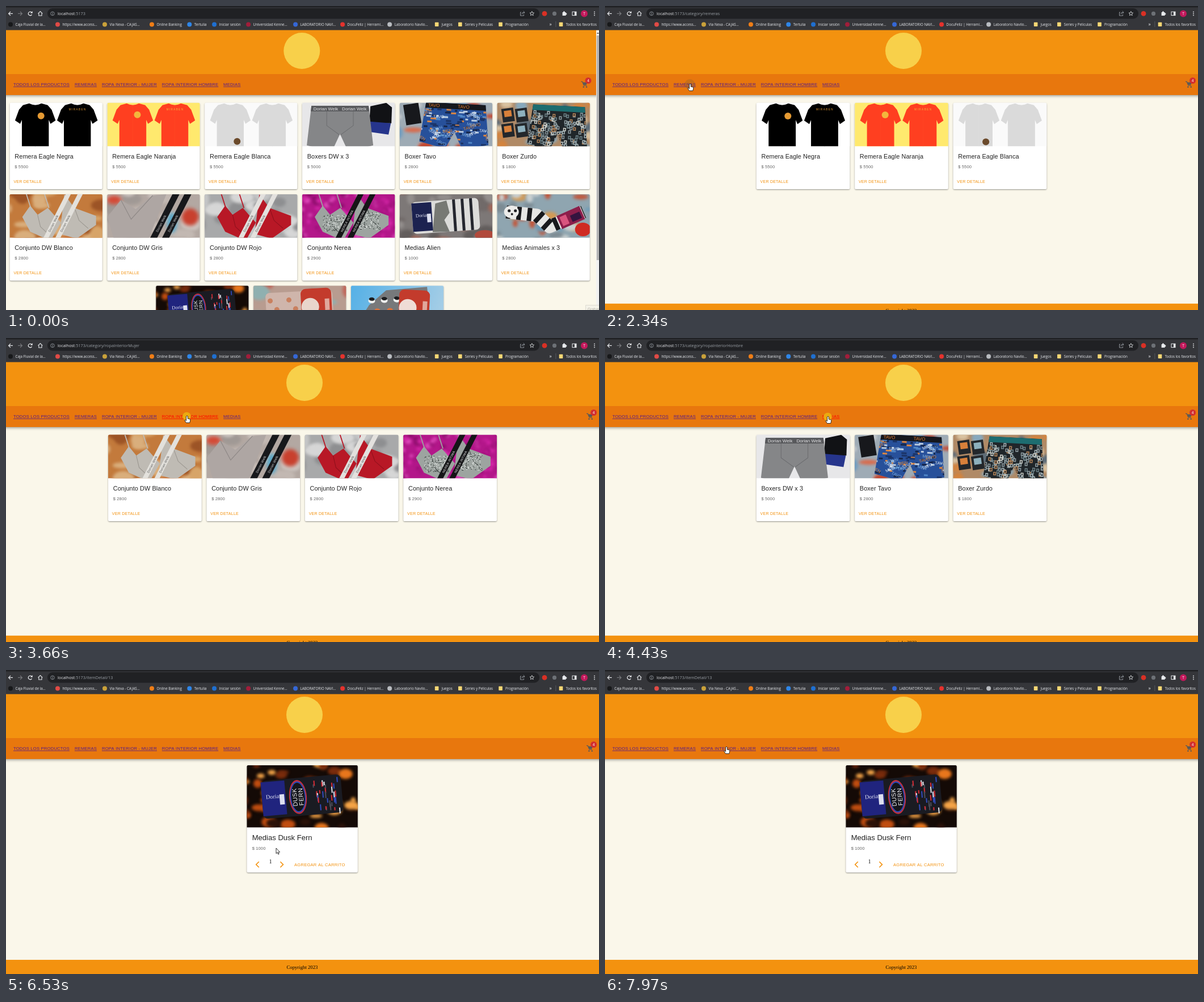
An HTML page with a canvas for the animation above (8 s loop, 1045 by 536 pixels).

```html
<!DOCTYPE html>
<html lang="es">
<head>
<meta charset="utf-8">
<style>
html, body { margin: 0; width: 100%; height: 100%; overflow: hidden; background: #faf7ea; }
canvas { display: block; width: 100vw; height: 100vh; }
</style>
</head>
<body>
<canvas id="stage" width="1045" height="536"></canvas>
<script>
const W = 1045, H = 536, LOOP = 8000, STEP = 70;
const SANS = '"Liberation Sans", Arial, sans-serif';
const SERIF = '"Liberation Serif", "Times New Roman", serif';
const UI = '"Open Sans", "Noto Sans", sans-serif';
const ORANGE = '#f3920f';
const screen = document.getElementById('stage').getContext('2d');
let g = screen, seed = 1;

// ---- drawing helpers ----
const rnd = () => (seed = seed * 16807 % 2147483647) / 2147483647;
const pick = list => list[Math.floor(rnd() * list.length)];
function rect(color, x, y, w, h, r = 0) {
  g.fillStyle = color; g.beginPath(); g.roundRect(x, y, w, h, r); g.fill();
}
function oval(color, x, y, rx, ry = rx) {
  g.fillStyle = color; g.beginPath(); g.ellipse(x, y, rx, ry, 0, 0, 7); g.fill();
}
function arc(color, width, x, y, r, from = 0, to = 7) {
  g.strokeStyle = color; g.lineWidth = width; g.beginPath(); g.arc(x, y, r, from, to); g.stroke();
}
function trace(pts) {
  g.beginPath();
  for (let i = 0; i < pts.length; i += 2) g.lineTo(pts[i], pts[i + 1]);
}
function poly(color, ...pts) { g.fillStyle = color; trace(pts); g.closePath(); g.fill(); }
function line(color, width, pts, dash = []) {
  g.strokeStyle = color; g.lineWidth = width; g.setLineDash(dash);
  trace(pts); g.stroke(); g.setLineDash([]);
}
function chevron(color, width, x, y, dx, dy) {
  line(color, width, [x + dx, y - dy, x, y, x + dx, y + dy]);
}
function text(str, x, y, size, color, font = SANS, gap = 0, align = 'left') {
  g.font = size + 'px ' + font; g.letterSpacing = gap + 'px';
  g.textAlign = align; g.fillStyle = color; g.fillText(str, x, y);
  return g.measureText(str).width;
}
function at(x, y, deg, draw) {
  g.save(); g.translate(x, y); g.rotate(deg * Math.PI / 180); draw(); g.restore();
}
function scatter(n, start, x, y, w, h, draw) {
  seed = start;
  for (let i = 0; i < n; i++) draw(x + rnd() * w, y + rnd() * h, i);
}
// soft blurred backdrop of a photo
function backdrop(base, n, size, ...colors) {
  rect(base, -5, -20, 175, 125);
  g.filter = 'blur(2.5px)';
  scatter(n, n * 7 + size, -6, -12, 175, 100, (x, y) =>
    oval(pick(colors), x, y, size * (.4 + rnd()), size * (.3 + rnd() * .7)));
  g.filter = 'none';
}

// ---- product photos, drawn in a 163 x 77 box ----
function shirts(back, cloth, mark, mx, my, word) {
  rect(back, 0, -10, 165, 100);
  for (const cx of [45, 119]) for (const side of [-1, 1]) {
    const half = [0, 4, 6, 3, 11, 1, 22, 4, 29, 12, 36, 31, 27, 37, 24, 30, 24, 80, 0, 80];
    poly(cloth, ...half.map((v, i) => i % 2 ? v : cx + side * v - side * .3));
  }
  oval(mark, mx, my, 6);
  if (word) text(word, 119.5, 13, 4.6, mark, SANS, 1.4, 'center');
}
function boxer(x, y, w, tilt, cloth, band, word, ink, print) {
  at(x, y, tilt, () => {
    trace([.07 * w, 0, .93 * w, 0, w, 70, .62 * w, 80, .5 * w, 50, .38 * w, 80, 0, 70]);
    g.closePath(); g.clip();
    rect(cloth, 0, 0, w, 80);
    if (print) print(w);
    rect(band, 0, 0, w, 10);
    for (const k of [.1, .53]) text(word, k * w, 7.8, 8, ink);
  });
}
function bands(cloth, ink, word, width, x) {
  for (const dx of [0, 21]) {
    line(cloth, width, [x + dx, -6, x - 46 + dx, 84]);
    at(x - 35 + dx, 67, -63, () => text(word, 0, 0, 5.5, ink, SANS, .3));
  }
}
function lingerie(cloth, shade) {
  for (const x of [28, 60]) line(cloth, 1.8, [x + 9, 24, x, -4]);
  poly(cloth, 22, 40, 36, 20, 49, 36, 67, 24, 90, 50, 72, 82, 36, 66);
  poly(cloth, 96, 0, 114, 24, 152, 38, 152, 54, 118, 78, 88, 70);
  line(shade, 1, [49, 36, 54, 57, 70, 72]);
  line(shade, 1, [114, 24, 122, 46, 138, 60]);
}
function sock(cloth, tilt, tag, draw) {
  at(82, 37, tilt, () => {
    rect(cloth, -60, -27, 118, 56, 7);
    draw();
    if (!tag) return;
    rect(tag, -60, -25, 35, 50);
    text('Dorian', -54, 0, 8.5, '#e5e8f6', SERIF);
    rect('#dcdff0', -34, -5, 7, 15);
  });
}
function roundTag(cloth, disc, tilt, draw) {
  sock(cloth, tilt, '', () => {
    draw();
    rect('#c33b2c', 2, -31, 54, 62, 9);
    oval(disc, 18, 1, 15.5);
    rect('#e0a79c', 44, -12, 8, 20);
  });
}

const photos = [
  () => shirts('#fff', '#000', '#e59a33', 55, 23, 'MIRABEN'),
  () => shirts('#ffe96e', '#ff3f20', '#f3b73c', 53, 21, 'MIRABEN'),
  () => shirts('#fafafa', '#dadada', '#6b4a2b', 57, 68),
  () => {
    rect('#e7e7e9', 0, -10, 165, 100);
    poly('#111215', 120, 6, 148, 0, 158, 8, 157, 36, 118, 36);
    poly('#26358c', 119, 33, 156, 36, 152, 56, 117, 51);
    boxer(8, 5, 117, 0, '#858688', '#58595c', 'Dorian Welk', '#e6e6e8',
      w => [.3, .7].forEach(k => line('#6b6c6f', 1, [w * k, 10, w * k, 35, w / 2, 52])));
  },
  () => {
    backdrop('#9eabb5', 26, 13, '#c4472f', '#6f9cc0', '#c9cdd0', '#7d8a99', '#d96a4b');
    at(6, 4, -9, () => rect('#17181c', 0, 0, 27, 36));
    boxer(38, -2, 122, 3, '#27509a', '#16181d', 'TAVO', '#e07a2c', w => {
      scatter(110, 8, 0, 8, w, 64, (x, y) =>
        rect(pick(['#1b3468', '#4f86c6', '#b9cbe0', '#16264a', '#d98543']), x, y, 3 + rnd() * 8, 3));
      scatter(26, 21, -6, 14, w, 62, (x, y, i) => at(x, y, rnd() * 70 - 35, () =>
        text(i % 2 ? 'TAVO' : 'MEN', 0, 0, 7.5, pick(['#e6edf5', '#e28a3c', '#7fb0e0']))));
    });
  },
  () => {
    backdrop('#b08a66', 24, 12, '#d3843f', '#87a9bd', '#5d6c78', '#d9c2a0');
    for (let i = 0; i < 4; i++) at(7 + i % 2 * 24, 11 + (i >> 1) * 27, -8, () => {
      rect('#23272b', 0, 0, 21, 24);
      rect(i % 2 ? '#8db0bd' : '#d8803a', 4, 4, 13, 11);
    });
    boxer(56, 2, 106, 3, '#20262a', '#1d6d70', '', '#fff', w =>
      scatter(170, 5, 0, 10, w, 66, (x, y) => {
        rect(pick(['#a5b4b8', '#d0d3cc', '#6d8288', '#8f9da2', '#b5855a']), x, y, 5, 6);
        rect('#20262a', x + 1.5, y + 1.5, 2, 3);
      }));
  },
  () => {
    backdrop('#c37a3c', 26, 16, '#d7a468', '#b9622c', '#d9ae7c', '#c8743a', '#9c5426');
    lingerie('#bfbbb4', '#98948d');
    bands('#e3e1dc', '#555', 'Dorian Welk', 8, 106);
  },
  () => {
    backdrop('#b3a8a2', 18, 15, '#c2b8b2', '#a09995', '#cdc5c0');
    g.filter = 'blur(3px)';
    oval('#c8402e', 146, 40, 15, 15); oval('#5aa5c4', 114, 50, 9, 18); oval('#d34a36', 12, 10, 13, 8);
    g.filter = 'none';
    poly('#aea6a3', 0, 40, 24, 10, 50, 26, 80, 2, 104, 0, 72, 80, 12, 80);
    line('#8f8987', 1.2, [24, 10, 42, 44, 80, 2]);
    bands('#17181b', '#ddd', 'Dorian Welk', 11, 124);
  },
  () => {
    backdrop('#a8a9aa', 20, 17, '#c4c5c6', '#8e8f91', '#d6d6d6');
    lingerie('#b81826', '#8d0f1b');
    bands('#e3e1de', '#555', 'Dorian Welk', 8, 106);
  },
  () => {
    backdrop('#b3178a', 120, 5, '#d828ab', '#8b0f6b', '#e04fbd', '#a0147c');
    lingerie('#9da4a0', '#3e4543');
    g.globalCompositeOperation = 'source-atop';
    for (const [x, y, w, h] of [[36, 36, 42, 28], [98, 32, 38, 30]])
      scatter(130, x, x, y, w, h, (px, py) => rect(pick(['#3e4543', '#dfe3e1']), px, py, 1.8, 1.2));
    g.globalCompositeOperation = 'source-over';
    bands('#151517', '#eee', 'NEREA INTIMA', 9, 106);
  },
  () => {
    backdrop('#7d7877', 25, 14, '#938e8c', '#625d5c', '#a0675a', '#716a69');
    oval('#b14a3c', 150, 72, 18, 9);
    sock('#dcdcda', -4, '#1c2250', () => {
      for (let x = 12; x < 50; x += 15) rect('#24262e', x, -27, 5, 56);
      poly('#777974', -26, 28, -18, -22, 2, -26, 6, -4, -4, 8, 4, 29);
    });
  },
  () => {
    backdrop('#8fa5b0', 40, 10, '#6c9cb8', '#d39a55', '#c9cfd0', '#7c8b93', '#c2573b');
    oval('#cf2a22', 151, 62, 14, 12);
    const path = [16, 31, 70, 37, 92, 57, 152, 31];
    g.lineJoin = 'round';
    line('#e6e6e4', 23, path);
    line('#18191c', 23, path, [8, 10.5]);
    oval('#ececea', 25, 31, 13, 11);
    for (const x of [21, 32]) oval('#202124', x, 29, 2.6);
    oval('#202124', 26, 35, 2);
    at(126, 43, -24, () => {
      rect('#8c1f4b', -18, -13, 44, 25);
      rect('#d9557f', -14, -9, 12, 17); rect('#35143f', 4, -4, 18, 12);
    });
  },
  () => {
    backdrop('#140a06', 48, 8, '#e8761c', '#f5a447', '#7a2c0c', '#c04d10', '#2a1108');
    sock('#1a1b22', -5, '#20247e', () => {
      scatter(34, 9, 16, -24, 36, 46, (x, y) =>
        rect(pick(['#d9dbe2', '#cc2b34', '#3049b5', '#4a4c58']), x, y, 1.8, 4 + rnd() * 6));
      ['#c62f3a', '#2c48b4', '#14151b'].forEach((color, i) => oval(color, -7, 1, 13 - i * 1.5, 25 - i * 2));
      at(-8, 1, -90, () => ['DUSK', 'FERN'].forEach((word, i) =>
        text(word, 0, i * 9 - .5, 9, '#f4f4f6', 'bold 9px ' === word ? SANS : SANS, .4, 'center')));
    });
  },
  () => {
    backdrop('#b89c90', 24, 15, '#c0675a', '#a3b3ab', '#cdb6a8', '#b0877c', '#8fb0b0');
    roundTag('#cfb5ab', '#e9d5cc', -3, () => {
      for (let i = 0; i < 6; i++) oval('#c9805f', -52 + i * 11, i % 3 * 16 - 13, 4.5);
    });
  },
  () => {
    const sky = g.createLinearGradient(0, 0, 163, 60);
    sky.addColorStop(0, '#55b0e6'); sky.addColorStop(1, '#a9cfe6');
    rect(sky, 0, -10, 165, 100);
    poly('#77797b', 14, 62, 32, 34, 62, 8, 134, 2, 136, 22, 120, 62, 24, 70);
    roundTag('#0000', '#efdcd6', 3, () => {
      for (let i = 0; i < 5; i++) {
        const x = i * 11 - 46, y = i % 2 * 20 - 8 - i;
        oval('#eef0ee', x, y, 6, 4.5); oval(i % 2 ? '#e0743c' : '#1d1e20', x, y - 3, 5, 3);
      }
    });
  }
];

const products = [
  ['Remera Eagle Negra', 5500], ['Remera Eagle Naranja', 5500], ['Remera Eagle Blanca', 5500],
  ['Boxers DW x 3', 5000], ['Boxer Tavo', 2800], ['Boxer Zurdo', 1800],
  ['Conjunto DW Blanco', 2800], ['Conjunto DW Gris', 2800], ['Conjunto DW Rojo', 2800],
  ['Conjunto Nerea', 2900], ['Medias Alien', 1000], ['Medias Animales x 3', 2800],
  ['Medias Dusk Fern', 1000], ['Medias Peach', 1000], ['Medias Sushi', 1000]
];

function panel(i, x, y, w, h, imageH, shift) {
  g.save();
  g.shadowColor = 'rgba(0,0,0,.42)'; g.shadowBlur = 2.2; g.shadowOffsetY = .9;
  rect('#fff', x, y, w, h, 2.2);
  g.restore();
  g.save();
  g.beginPath(); g.roundRect(x, y, w, imageH, [2.2, 2.2, 0, 0]); g.clip();
  g.translate(x, y); g.scale(w / 163, w / 163); g.translate(0, shift);
  photos[i]();
  g.restore();
}
function price(i, x, y) {
  text('$ ' + products[i][1], x, y, 7.62, 'rgba(0,0,0,.6)', SANS, .082);
}
function card(i, x, y, w) {
  panel(i, x, y, w, 152.3, 76.4, 0);
  text(products[i][0], x + 8.7, y + 98, 10.89, 'rgba(0,0,0,.87)', SANS, .082);
  price(i, x + 8.7, y + 115.2);
  text('VER DETALLE', x + 6.8, y + 141.3, 7.08, ORANGE, SANS, .202);
}
// a centred row of products first .. last
function row(first, last, y, mid, pitch) {
  const n = last - first + 1;
  for (let k = 0; k < n; k++)
    card(first + k, mid + (k - n / 2) * pitch + 4.35, y, pitch - 8.7);
}
function detail(i) {
  const x = 424.5, y = 168;
  panel(i, x, y, 195.3, 189, 109.5, 8);
  text(products[i][0], x + 9.2, y + 131.5, 13.06, 'rgba(0,0,0,.87)');
  price(i, x + 9.2, y + 149.3);
  chevron(ORANGE, 1.7, x + 16.3, y + 175, 5, 5);
  chevron(ORANGE, 1.7, x + 63.9, y + 175, -5, 5);
  text('1', x + 41.5, y + 173, 9.4, '#000', SERIF, 0, 'center');
  text('AGREGAR AL CARRITO', x + 83.5, y + 177.7, 7.62, ORANGE, SANS, .218);
}

// ---- browser frame ----
const FOLDER = '#f7d774';
const bookmarks = [
  ['Caja Fluvial de la...', '#17181a'], ['https://www.access...', '#e04a45'],
  ['Via Nexa - CAJAS...', '#c9a13a'], ['Online Banking', '#ef7d16'], ['Tertulia', '#2e86e8'],
  ['Iniciar sesión', '#1f6fd0'], ['Universidad Kenne...', '#a11d3a'],
  ['LABORATORIO NAVI...', '#3567d6'], ['DocuFeliz | Herrami...', '#e5322d'],
  ['Laboratorio Navilo...', '#b9bcc0'], ['Juegos', FOLDER], ['Series y Peliculas', FOLDER],
  ['Programación', FOLDER]
];
const PALE = '#e8eaed', DIM = '#9aa0a6';
function bookmark(x, label, color) {
  if (color === FOLDER) rect(color, x - 3.3, 28.8, 6.6, 7.2, .8); else oval(color, x, 32.4, 4);
  const width = text(label, x + 8.5, 34.8, 6.25, PALE, UI);
  return x + 22 + (label.endsWith('...') ? 61 : width);
}
function browser(path) {
  const y = 13.4;
  rect('#35363a', 0, 0, W, 42.5);
  rect('#202124', 0, 0, W, 2.5);
  rect('#202124', 73, 4, 867, 18.5, 9);
  chevron(PALE, 1.2, 4.6, y, 3.4, 3.4); line(PALE, 1.2, [4.8, y, 12, y]);
  chevron('#77797d', 1.2, 28.4, y, -3.4, 3.4); line('#77797d', 1.2, [21, y, 28.2, y]);
  arc(PALE, 1.2, 42.7, y, 3.3, .5, 5.6);
  poly(PALE, 46.7, 9, 46.7, 12.8, 43, 12.8);
  line(PALE, 1.1, [56.4, y, 60.4, 9.6, 64.4, y]);
  line(PALE, 1.1, [57.8, 12.4, 57.8, 17, 63, 17, 63, 12.4]);
  arc(DIM, .8, 82, y, 3.3);
  rect(DIM, 81.6, 12.8, .9, 2.6); rect(DIM, 81.6, 11.3, .9, .9);
  const host = text('localhost', 91, 16, 7.25, PALE, UI);
  text(':5173' + path, 91 + host, 16, 7.25, DIM, UI);
  line(DIM, .9, [908, 11, 906.5, 11, 906.5, 17, 912.5, 17, 912.5, 15]);
  chevron(DIM, .9, 914, 11.4, -2.4, 2.4); line(DIM, .9, [909, 14.5, 910, 11.8, 914, 11.4]);
  const star = [];
  for (let i = 0; i <= 10; i++) {
    const r = i % 2 ? 1.8 : 4, a = i * Math.PI / 5;
    star.push(926.8 + r * Math.sin(a), y - r * Math.cos(a));
  }
  line(PALE, .8, star);
  oval('#d93025', 949, y, 4.4);
  oval('#6d7176', 966.5, y, 3.6);
  rect(PALE, 980.6, 11, 6, 6); oval(PALE, 983.4, 10.6, 1.4); oval(PALE, 987, 14, 1.4);
  rect(PALE, 997.5, 9.7, 8, 7.4); rect('#35363a', 998.5, 10.7, 3.4, 5.4);
  oval('#c2185b', 1019, y, 6); text('T', 1019, 15.9, 6.5, '#fff', UI, 0, 'center');
  for (const dy of [-3, 0, 3]) oval(PALE, 1037, y + dy, .9);
  let x = 8;
  for (const [label, color] of bookmarks) x = bookmark(x, label, color);
  bookmark(978, 'Todos los favoritos', FOLDER);
  text('»', 957.6, 34.8, 8.5, PALE, UI);
  rect('#5f6368', 968.5, 27, .8, 10);
}

function header(logoX, x) {
  const gray = '#5c5a58';
  g.save();
  g.shadowColor = 'rgba(0,0,0,.4)'; g.shadowBlur = 5; g.shadowOffsetY = 1.6;
  rect('#e8770d', -10, 120, W + 20, 37);
  g.restore();
  rect(ORANGE, 0, 42, W, 78);
  oval('#f8d04a', logoX, 79, 32);
  line(gray, 1.2, [x - 6, 133.4, x - 3.8, 133.4, x - 1, 140.2, x + 4, 140.2]);
  poly(gray, x - 3.4, 134.4, x + 5.6, 134.4, x + 3, 139, x - 1.6, 139);
  for (const dx of [-1.6, 3.7]) oval(gray, x + dx, 142.8, 1.3);
  oval('#d32f2f', x + 6.6, 131.5, 5.5);
  text('4', x + 6.6, 134, 6.5, '#fff', SANS, 0, 'center');
}

// path and product range of each page
const pages = [
  ['', 0, 14], ['/category/remeras', 0, 2], ['/category/ropaInteriorMujer', 6, 9],
  ['/category/ropaInteriorHombre', 3, 5], ['/category/medias', 10, 14], ['/itemDetail/13', 12, 12]
].map(([path, first, last]) => {
  const canvas = document.createElement('canvas');
  canvas.width = W; canvas.height = H;
  g = canvas.getContext('2d');
  rect('#faf7ea', 0, 0, W, H);
  if (!path) {
    header(521.3, 1019.4);
    for (let i = 0; i <= last; i += 6)
      row(i, Math.min(i + 5, last), 170.8 + i / 6 * 161.2, 517.7, 171.8);
    rect('#f1f1f1', 1040, 42.5, 5, H);
    rect('#b4b4b4', 1040.8, 52, 4.2, 396);
    poly('#505050', 1041, 49, 1045, 49, 1043, 46.5);
  } else {
    header(526, 1029);
    const single = first === last, top = single ? 511 : 524.7;
    if (single) detail(first); else row(first, last, 170.8, 522.5, 173.4);
    rect(ORANGE, 0, top, W, 30);
    text('Copyright 2023', 494.5, top + 15.7, 8.71, '#000', SERIF);
  }
  browser(path);
  return canvas;
});
g = screen;

// ---- interaction ----
const labels = ['TODOS LOS PRODUCTOS', 'REMERAS', 'ROPA INTERIOR - MUJER', 'ROPA INTERIOR HOMBRE', 'MEDIAS'];
const presses = [2200, 2960, 3660, 4430, 6390];   // each opens the next page
const DELAY = 140;
// start, steps, end x, end y
const moves = [
  [260, 12, 274, 207], [1300, 5, 130, 139], [1650, 3, 150, 137], [2480, 6, 175, 138],
  [3170, 4, 405, 145], [3450, 3, 319, 137], [3940, 6, 393, 138], [4640, 8, 485, 311],
  [5200, 3, 476, 314], [6870, 4, 403, 223], [7150, 5, 187, 140], [7500, 2, 221, 137],
  [7700, 4, 214, 135]
];
const ARROW = new Path2D('M0 0V9.6L2.2 7.6 3.7 11 5.2 10.3 3.8 7.1H6.6Z');
const HAND = new Path2D('M-1.4 1Q0-.8 1.3 1V5.2L5.2 6Q6 6.4 5.8 8L4.8 12.5H-1.5L-4 8.6Q-4.6 7.3-3.3 7.3L-1.4 8.8Z');

function pointer(t) {
  let x = 1006, y = 556;
  for (const [start, steps, ex, ey] of moves) {
    if (t < start) break;
    const p = Math.min(1, (Math.floor((t - start) / STEP) + 1) / steps);
    const k = p * p * (3 - 2 * p);
    x += (ex - x) * k; y += (ey - y) * k;
  }
  return [x, y];
}

function draw(t) {
  const page = presses.filter(p => t >= p + DELAY).length;
  const link = presses.findIndex(p => t >= p && t < p + DELAY + STEP) + 1;
  const pressed = link > 0 && link < labels.length;
  const held = pressed && t < presses[link - 1] + DELAY;
  const [x, y] = pointer(t);
  let hover = page === 4 && y > 302 && y < 318 && x > 441 && x < 503;
  g.drawImage(pages[page], 0, 0);
  let left = 13;
  labels.forEach((label, i) => {
    const color = held && link === i ? '#f00' : '#551a8b';
    const width = text(label, left, 141, 7.62, color, SANS, .218);
    rect(color, left, 142, width, .7);
    hover ||= y > 131 && y < 145 && x >= left && x <= left + width;
    left += width + 8.9;
  });
  if (t < STEP) {
    rect('#f4f2e8', 1021, 527, 30, 20);
    line('#d8d6cc', .8, [1021.5, 540, 1021.5, 527.5, 1046, 527.5]);
    text('Grabar', 1025, 537, 6.5, '#aaa89f', UI);
  }
  if (pressed) oval(held ? '#ebaa10' : 'rgba(110,90,60,.24)', x - .5, y + 1, held ? 7.3 : 9);
  const shape = hover ? HAND : ARROW;
  g.save();
  g.translate(x, y);
  g.fillStyle = '#fff'; g.strokeStyle = '#1c1c1c'; g.lineWidth = .9; g.lineJoin = 'round';
  g.fill(shape); g.stroke(shape);
  g.restore();
}

const begin = performance.now();
function frame() {
  draw((performance.now() - begin) % LOOP);
  requestAnimationFrame(frame);
}
frame();
</script>
</body>
</html>
```
